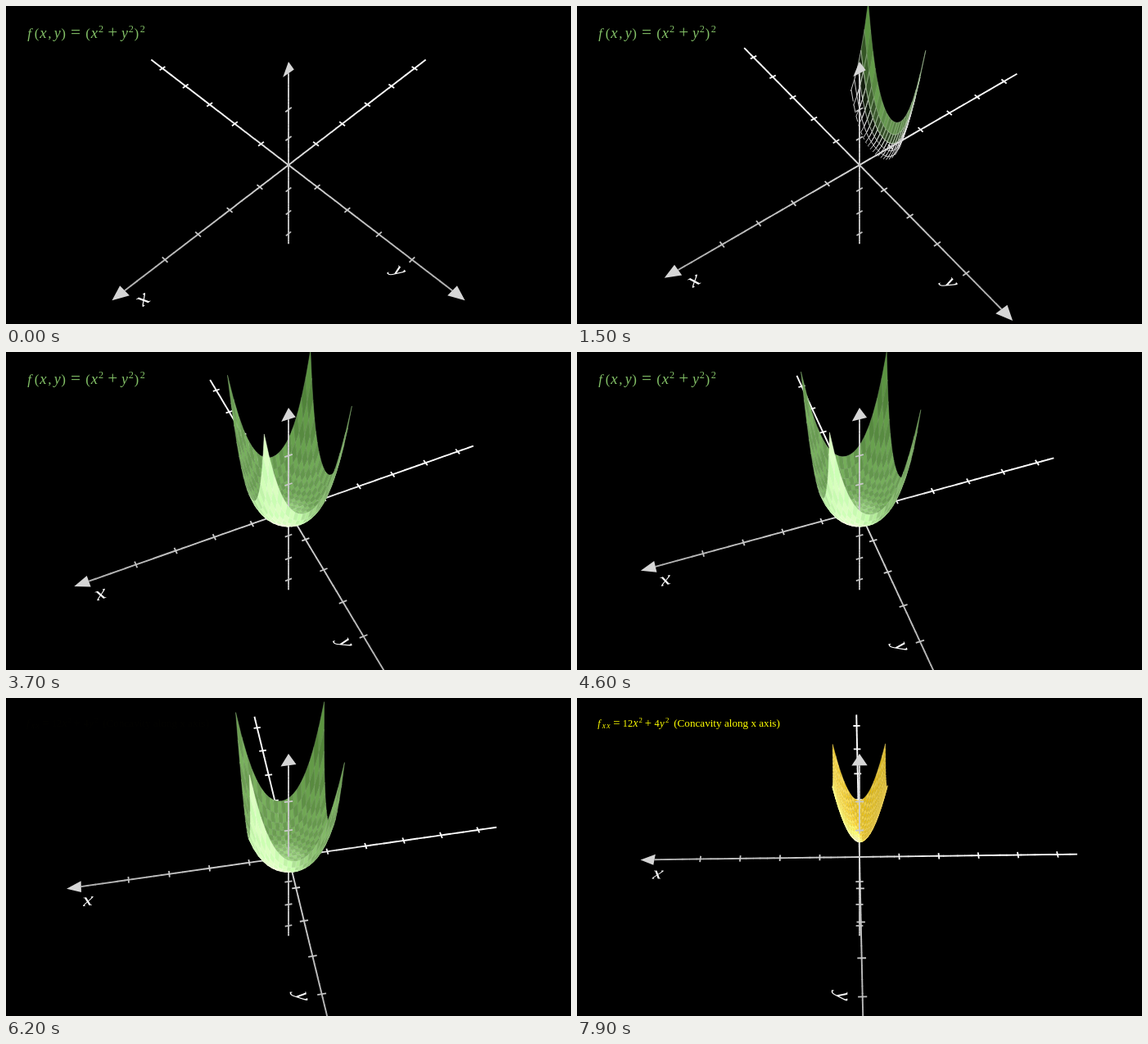
Write an HTML page with a canvas that moves like this. It is 690 px wide and 388 px high and loops after 8000 ms.

```html
<!DOCTYPE html>
<html lang="en">
<head>
<meta charset="utf-8">
<title>Concavity of a surface</title>
<style>
  html, body { margin: 0; width: 100%; height: 100%; overflow: hidden; background: #000; }
  canvas { display: block; }
</style>
</head>
<body>
<canvas id="stage" width="690" height="388"></canvas>
<script>
const ctx = document.getElementById('stage').getContext('2d');
const LOOP = 8000, STEP = 100;
const UNIT = 48.5, CX = 345, CY = 194, FOCAL = 20;
const RAD = Math.PI / 180;
const SIN_PHI = Math.sin(40 * RAD), COS_PHI = Math.cos(40 * RAD);
const LIGHT = [-7, -9, 10];
const N = 20;
const SERIF = '"Liberation Serif", "Times New Roman", serif';
const GREENS = [[119, 176, 93], [105, 156, 82]];
const YELLOWS = [[244, 211, 69], [232, 193, 28]];

let sinT = 0, cosT = 1;

const clamp = (v, a = 0, b = 1) => Math.min(b, Math.max(a, v));
const mix = (a, b, k) => a + (b - a) * k;
const mix3 = (a, b, k) => a.map((v, i) => mix(v, b[i], k));
const rgb = (c, a = 1) => `rgba(${c.map(v => Math.round(clamp(v, 0, 255))).join()},${a})`;
const sigmoid = x => 1 / (1 + Math.exp(-x));
function smooth(t) {
  const e = sigmoid(-5);
  return clamp((sigmoid(10 * (clamp(t) - 0.5)) - e) / (1 - 2 * e));
}

// ---- camera ----
function depth([x, y, z]) {
  return (x * cosT + y * sinT) * SIN_PHI + z * COS_PHI;
}
function project(p) {
  const [x, y, z] = p;
  const k = UNIT * FOCAL / (FOCAL - depth(p));
  const sx = -x * sinT + y * cosT;
  const sy = -(x * cosT + y * sinT) * COS_PHI + z * SIN_PHI;
  return [CX + sx * k, CY - sy * k];
}
function trace(points) {
  ctx.beginPath();
  points.forEach((p, i) => {
    const [x, y] = project(p);
    i ? ctx.lineTo(x, y) : ctx.moveTo(x, y);
  });
}

// ---- surfaces ----
const bowl = (u, v) => [u, v, (u * u + v * v) ** 2];
function trough(u, v) {
  const x = 0.597 * u, y = 0.665 * v;
  return [x, y, 0.87 + 5.13 * x * x + 1.1 * y * y];
}

function lightFactor(q) {
  const a = q[2].map((v, i) => v - q[0][i]);
  const b = q[3].map((v, i) => v - q[1][i]);
  const n = [a[1] * b[2] - a[2] * b[1], a[2] * b[0] - a[0] * b[2], a[0] * b[1] - a[1] * b[0]];
  const s = LIGHT.map((v, i) => v - (q[0][i] + q[2][i]) / 2);
  const dot = n.reduce((t, v, i) => t + v * s[i], 0) / (Math.hypot(...n) * Math.hypot(...s) || 1);
  const f = 0.5 * dot ** 3;
  return 255 * (f < 0 ? f / 2 : f);
}

function partialOutline(q, amount) {
  const ring = [...q, q[0]], out = [q[0]];
  const end = amount * 4;
  for (let i = 0; i < 4 && i < end; i++) out.push(mix3(ring[i], ring[i + 1], clamp(end - i)));
  return out;
}

function drawFace(q, base, p) {
  const f = lightFactor(q);
  const fill = base.map(v => v + f);
  const edge = [187, 187, 187].map(v => v + Math.max(f, 0) + 25);
  ctx.lineJoin = 'round';
  if (p < 0.5) {
    trace(partialOutline(q, p * 2));
    ctx.strokeStyle = rgb(edge);
    ctx.lineWidth = 0.97;
    ctx.stroke();
    return;
  }
  const k = p * 2 - 1;
  trace(q);
  ctx.closePath();
  ctx.fillStyle = rgb(fill, k);
  ctx.fill();
  ctx.strokeStyle = rgb(mix3(edge, mix3(edge, fill, 0.75), k));
  ctx.lineWidth = mix(0.97, 0.45, k);
  ctx.stroke();
}

function addSurface(items, written, morph) {
  const total = N * N, lag = 4 / total;
  const at = (i, j) => {
    const u = 2 * i / N - 1, v = 2 * j / N - 1;
    return mix3(bowl(u, v), trough(u, v), morph);
  };
  for (let i = 0; i < N; i++) for (let j = 0; j < N; j++) {
    const p = clamp(written * ((total - 1) * lag + 1) - (i * N + j) * lag);
    if (p <= 0) continue;
    const q = [at(i, j), at(i + 1, j), at(i + 1, j + 1), at(i, j + 1)];
    const c = (i + j) % 2;
    const base = mix3(GREENS[c], YELLOWS[c], morph);
    items.push({ d: depth(mix3(q[0], q[2], 0.5)), draw: () => drawFace(q, base, p) });
  }
}

// ---- axes ----
const AXES = [
  { dir: [1, 0, 0], side: [0, 1, 0], max: 5.5, bias: -0.05 },
  { dir: [0, 1, 0], side: [1, 0, 0], max: 5.5, bias: -0.05 },
  { dir: [0, 0, 1], side: [1, 0, 0], max: 3.5, bias: 0 }
];
const TIP = 0.35, TICK = 0.1;

function axisShade(s, upright) {
  const v = upright ? 200 + 2 * s : s < 0 ? 214 + 40 * clamp(-s / 3) : 212 - 7 * s;
  return rgb([v, v, v]);
}

function addAxis(items, { dir, side, max, bias }) {
  const upright = dir[2] === 1;
  const at = (s, w = 0) => dir.map((v, i) => v * s + side[i] * w);
  const addLine = (a, b, s, width, lift) => items.push({
    d: depth(mix3(a, b, 0.5)) + bias + lift,
    draw() {
      trace([a, b]);
      ctx.lineCap = 'butt';
      ctx.strokeStyle = axisShade(s, upright);
      ctx.lineWidth = width;
      ctx.stroke();
    }
  });
  const pieces = 60, end = max - TIP, len = (end + max) / pieces;
  for (let i = 0; i < pieces; i++) {
    const s = -max + i * len;
    addLine(at(s), at(Math.min(end, s + len * 1.08)), s + len / 2, 1.9, 0);
  }
  for (let n = -Math.floor(max); n < Math.floor(max); n++) {
    if (n) addLine(at(n, -TICK), at(n, TICK), n - 1, 1.8, 0.01);
  }
  items.push({
    d: depth(at(max)) + bias,
    draw() {
      trace([at(max), at(end, TIP / 2), at(end, -TIP / 2)]);
      ctx.fillStyle = '#d6d6d6';
      ctx.fill();
    }
  });
}

// Letter lying flat in the ground plane; right and up are ground directions.
function groundLetter(ch, pos, right, up, size) {
  const o = project(pos), h = 0.05;
  const slope = v => project(pos.map((c, i) => c + v[i] * h)).map((c, i) => (c - o[i]) / h);
  const r = slope(right), u = slope(up), k = size / 100;
  ctx.save();
  ctx.transform(r[0] * k, r[1] * k, -u[0] * k, -u[1] * k, o[0], o[1]);
  ctx.font = `italic 100px ${SERIF}`;
  ctx.textAlign = 'center';
  ctx.fillStyle = '#fff';
  ctx.fillText(ch, 0, ch === 'y' ? 12 : 22);
  ctx.restore();
}

// ---- formulas: [text, centre x, italic, size factor, raise] ----
function formula(parts, size, base, color, alpha) {
  if (alpha <= 0) return;
  ctx.globalAlpha = alpha;
  ctx.fillStyle = color;
  ctx.textAlign = 'center';
  for (const [text, x, italic, scale = 1, raise = 0] of parts) {
    ctx.font = `${italic ? 'italic ' : ''}${size * scale}px ${SERIF}`;
    ctx.fillText(text, x, base - raise);
  }
  ctx.globalAlpha = 1;
}
const MAIN = [
  ['f', 28.5, 1], ['(', 37.5, 0], ['x', 45.3, 1, 1.1], [',', 53.3, 0], ['y', 62.6, 1, 1.05],
  [')', 70, 0], ['=', 85, 0, 1.25], ['(', 100, 0], ['x', 107.8, 1, 1.1], ['2', 116, 0, 0.72, 6.3],
  ['+', 130.3, 0, 1.25], ['y', 145, 1, 1.05], ['2', 152.8, 0, 0.72, 6.3], [')', 159.3, 0],
  ['2', 166.8, 0, 0.72, 6.3]
];
const SECOND = [
  ['f', 27, 1], ['x', 33, 1, 0.78, -2], ['x', 38.3, 1, 0.78, -2], ['=', 48.5, 0, 1.2],
  ['12', 62, 0], ['x', 71.5, 1, 1.1], ['2', 77.6, 0, 0.72, 4.4], ['+', 86.8, 0, 1.2],
  ['4', 97.6, 0], ['y', 103.8, 1, 1.05], ['2', 110.2, 0, 0.72, 4.4],
  ['(Concavity along x axis)', 183, 0, 1.07]
];

function render(ms) {
  const t = Math.max(0, Math.floor(ms / STEP) * STEP / 1000 - 0.09);
  const theta = (45 + 5.64 * t) * RAD;
  sinT = Math.sin(theta);
  cosT = Math.cos(theta);

  ctx.fillStyle = '#000';
  ctx.fillRect(0, 0, 690, 388);

  const items = [];
  AXES.forEach(a => addAxis(items, a));
  addSurface(items, clamp((t - 1) / 2), smooth(t - 6));
  items.sort((a, b) => a.d - b.d).forEach(it => it.draw());

  groundLetter('x', [5, 0.48, 0], [1, 0, 0], [0, 1, 0], 0.56);
  groundLetter('y', [0.51, 3.98, 0], [0, 1, 0], [-1, 0, 0], 0.52);

  formula(MAIN, 17, 38.5, '#83c167', 1 - smooth(t - 5));
  formula(SECOND, 12.3, 34.5, '#ffff00', smooth(t - 6));
}

function tick() {
  render(performance.now() % LOOP);
  requestAnimationFrame(tick);
}
tick();
</script>
</body>
</html>
```
